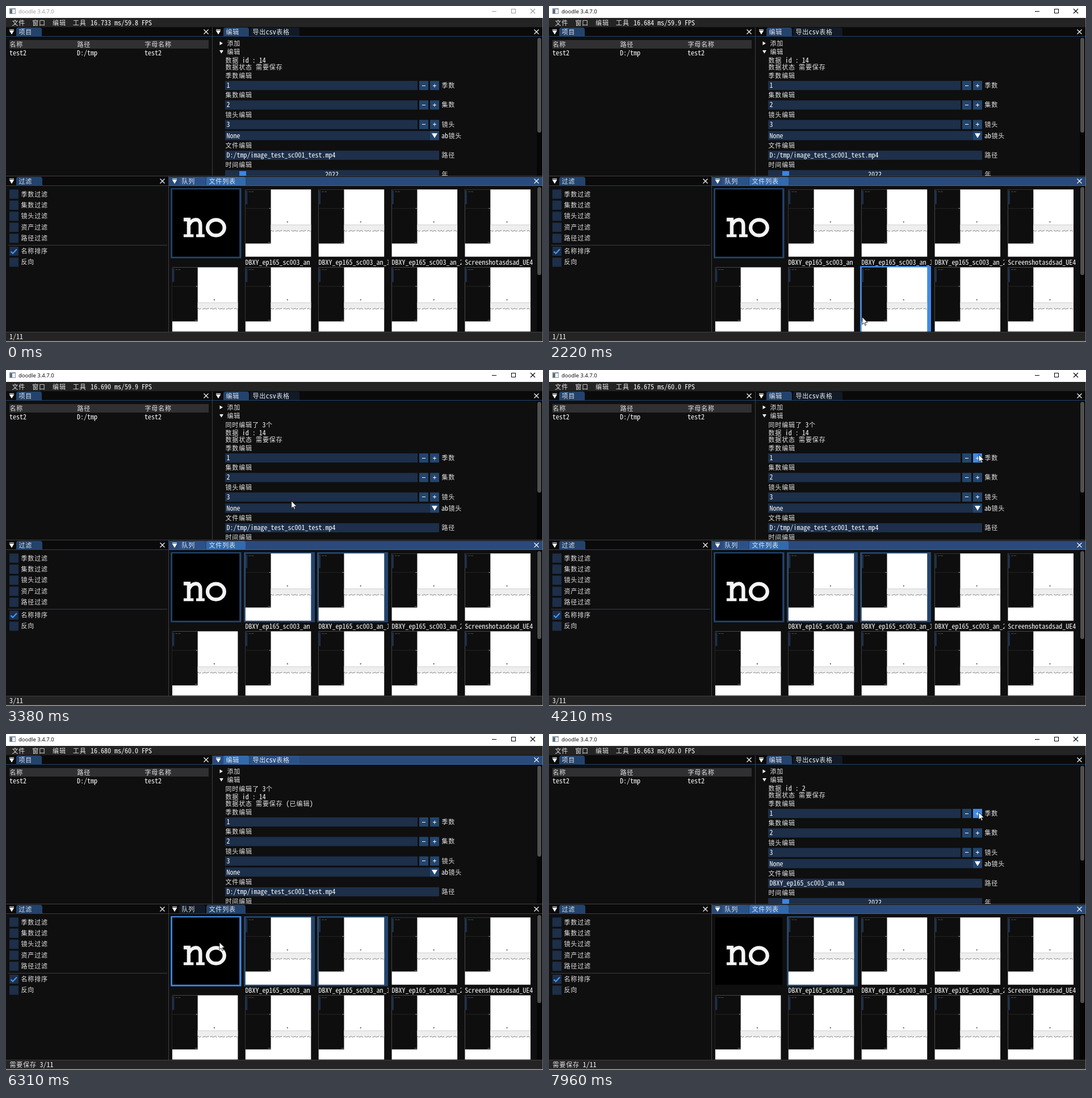
An HTML page with a canvas for the animation above (8 s loop, 946x592 px).

```html
<!DOCTYPE html>
<html lang="zh">
<head>
<meta charset="utf-8">
<title>doodle</title>
<style>
html, body { margin: 0; width: 100%; height: 100%; overflow: hidden; background: #0f0f0f; }
canvas { display: block; }
</style>
</head>
<body>
<canvas id="stage" width="946" height="592"></canvas>
<script>
const ctx = document.getElementById('stage').getContext('2d');
const LOOP = 8000;
const C = {
  bg: '#0f0f0f', bar: '#242424', title: '#0a0a0a', titleOn: '#294a7a',
  tab: '#2b5288', tabOn: '#3369ad', tabDim: '#111a26', tabDimOn: '#23436c',
  frame: '#1d2f49', button: '#23456d', hover: '#3f8ae6', grab: '#3d85e0',
  check: '#4296fa', line: '#3f3f47', scroll: '#4f4f4f', head: '#303033'
};

// Pointer path: time, x, y
const PATH = [
  [1320, 508, 590], [1400, 510, 560], [1480, 513, 519], [1700, 520, 505],
  [2060, 535, 540], [2300, 560, 552], [2600, 580, 420], [2850, 573, 369],
  [2960, 573, 369], [3140, 540, 318], [3380, 502, 231], [3710, 750, 147],
  [3960, 757, 149], [4960, 757, 149], [5130, 735, 149], [5500, 735, 149],
  [5800, 620, 230], [6070, 460, 318], [6290, 376, 367], [6680, 376, 367],
  [6800, 470, 370], [7310, 480, 360], [7460, 629, 160], [7580, 629, 160],
  [7720, 757, 138], [8000, 757, 138]
];
// Frame cost: time, milliseconds
const COST = [
  [0, 16.733], [80, 16.709], [320, 16.686], [490, 16.686], [1230, 16.68],
  [1480, 16.69], [2880, 16.678], [3380, 16.69], [4780, 16.665],
  [6310, 16.68], [7470, 16.69], [7640, 16.703], [7960, 16.663], [8000, 16.663]
];
const FOCUS = 1900, RANGE = 2970, PLUS = 4500, MINUS = 5400, FIRST = 6450, SECOND = 6880;
const FRAME_H = 16.2;

function sample(keys, t, col) {
  let i = 1;
  while (i < keys.length - 1 && keys[i][0] < t) i++;
  const a = keys[i - 1], b = keys[i];
  const k = Math.min(1, Math.max(0, (t - a[0]) / (b[0] - a[0])));
  return a[col] + (b[col] - a[col]) * k;
}

const CJK = '300 11px "Noto Sans CJK SC", "Noto Sans CJK", sans-serif';
ctx.font = '12px "Noto Sans Mono CJK SC", monospace';
const halfWidth = Math.abs(ctx.measureText('0').width - 6) < 0.1;
const LATIN = halfWidth ? ctx.font : '10px "Noto Sans Mono", "DejaVu Sans Mono", monospace';

// Mixed text on a grid of 6 and 12 px cells, y is the middle of the line
function text(s, x, y) {
  for (const run of s.match(/[\x00-\x7f]+|[^\x00-\x7f]+/g)) {
    const wide = run.charCodeAt(0) > 127;
    ctx.font = wide ? CJK : LATIN;
    ctx.letterSpacing = wide ? '0.9px' : '0px';
    ctx.fillStyle = wide ? '#e4e4e4' : '#fff';
    ctx.fillText(run, x + (wide ? .4 : 0), Math.round(y + 4));
    x += run.length * (wide ? 11.9 : 6);
  }
  ctx.letterSpacing = '0px';
}

function rect(color, x, y, w, h) {
  ctx.fillStyle = color;
  ctx.fillRect(x, y, w, h);
}

const frame = (color, x, y, w) => rect(color, x, y - FRAME_H / 2, w, FRAME_H);

function round(color, x, y, w, h, r) {
  ctx.fillStyle = color;
  ctx.beginPath();
  ctx.roundRect(x, y, w, h, r);
  ctx.fill();
}

function poly(color, ...pts) {
  ctx.fillStyle = color;
  ctx.beginPath();
  pts.forEach(([x, y]) => ctx.lineTo(x, y));
  ctx.closePath();
  ctx.fill();
}

function stroke(color, width, ...lines) {
  ctx.strokeStyle = color;
  ctx.lineWidth = width;
  ctx.beginPath();
  for (const [x1, y1, x2, y2] of lines) {
    ctx.moveTo(x1, y1);
    ctx.lineTo(x2, y2);
  }
  ctx.stroke();
}

function clipped(x, y, w, h, draw) {
  ctx.save();
  ctx.beginPath();
  ctx.rect(x, y, w, h);
  ctx.clip();
  draw();
  ctx.restore();
}

const cross = (color, x, y, r) =>
  stroke(color, 1.1, [x - r, y - r, x + r, y + r], [x - r, y + r, x + r, y - r]);

const down = (x, y, r) => poly('#fff', [x - r, y - r * .8], [x + r, y - r * .8], [x, y + r * .9]);

function titleBar(on) {
  const ink = on ? '#000' : '#999';
  rect('#fff', 0, 0, 946, 21);
  rect('#8d949c', 6, 4, 11, 10);
  rect('#f4f4f4', 7, 6, 9, 7);
  rect('#56708c', 7, 6, 4, 7);
  ctx.fillStyle = ink;
  ctx.font = '9.5px "Open Sans", "Noto Sans", sans-serif';
  ctx.fillText('doodle 3.4.7.0', 22, 13);
  stroke(ink, 1, [856, 9.5, 864, 9.5]);
  ctx.strokeRect(890.5, 5.5, 7, 7);
  cross(ink, 928, 9, 4);
}

function menu(t) {
  rect(C.bar, 0, 21, 946, 16);
  ['文件', '窗口', '编辑', '工具'].forEach((s, i) => text(s, 10 + i * 35.8, 30));
  const ms = sample(COST, t, 1);
  text(`${ms.toFixed(3)} ms/${(1000 / ms).toFixed(1)} FPS`, 149, 30);
}

// tabs: label, x, width, active
function header(x, y, right, tabs, on) {
  rect(on ? C.titleOn : C.title, x, y, right - x, 15);
  rect(on ? C.tabOn : C.tabDimOn, x, y + 15, right - x, 1);
  rect('#fff', x + 6, y + 3, 8, 1);
  down(x + 10, y + 8.5, 4.3);
  for (const [label, tx, w, active] of tabs) {
    const color = on ? (active ? C.tabOn : C.tab) : (active ? C.tabDimOn : C.tabDim);
    round(color, tx, y, w, 15, [4, 4, 0, 0]);
    text(label, tx + 4, y + 8);
  }
  cross('#fff', right - 10.5, y + 7.5, 4);
}

function project() {
  header(0, 38, 363, [['项目', 18, 45, true]], false);
  rect(C.head, 6, 60, 351, 15);
  [['名称', 'test2'], ['路径', 'D:/tmp'], ['字母名称', 'test2']].forEach(([name, value], i) => {
    text(name, 6 + i * 119, 68);
    text(value, 6 + i * 119, 83);
  });
}

function stepButton(sign, x, y, p) {
  const hot = p && p.x >= x && p.x < x + 16 && p.y >= y - 8 && p.y < y + 8;
  frame(hot ? C.hover : C.button, x, y, 16);
  const mid = Math.floor(y) + .5;
  stroke('#fff', 1, [x + 5, mid, x + 11, mid]);
  if (sign === '+') stroke('#fff', 1, [x + 8, mid - 3, x + 8, mid + 3]);
}

function editor(s, p) {
  header(364, 38, 945, [['编辑', 383, 45, true], ['导出csv表格', 430, 87, false]], s.editing);
  rect('#060606', 935, 54, 10, 245);
  round(C.scroll, 936, 56, 7, s.many ? 160 : 167, 3.5);
  clipped(364, 54, 571, 245, () => {
    poly('#fff', [376.5, 62.5], [376.5, 69], [382, 65.7]);
    text('添加', 389, 66);
    down(379.5, 80.7, 3.4);
    text('编辑', 389, 81);
    if (s.many) text('同时编辑了 3个', 386, 97);
    const shift = s.many ? 15 : 0;
    ctx.translate(0, shift);
    text('数据 id : ' + s.id, 386, 96);
    text('数据状态 需要保存' + (s.edited ? ' (已编辑)' : ''), 386, 108);
    const local = p && { x: p.x, y: p.y - shift };
    [['季数', s.season], ['集数', 2], ['镜头', 3]].forEach(([label, value], i) => {
      const y = 140 + i * 34.4;
      text(label + '编辑', 386, y - 17);
      frame(C.frame, 386, y, 339);
      text(String(value), 388.5, y);
      stepButton('-', 728, y, local);
      stepButton('+', 747, y, local);
      text(label, 767, y);
    });
    frame(C.frame, 386, 228.3, 361);
    frame(C.button, 747, 228.3, 16);
    down(755, 228.3, 5);
    text('None', 388.5, 229);
    text('ab镜头', 767, 229);
    text('文件编辑', 386, 246);
    frame(C.frame, 386, 263, 377);
    text(s.path, 388.5, 263);
    text('路径', 767, 263);
    text('时间编辑', 386, 280);
    frame(C.frame, 386, 297.2, 377);
    rect(C.grab, 411, 291, 12, 12);
    text('2022', 562, 297);
    text('年', 767, 297);
  });
}

function filters() {
  header(0, 301, 286, [['过滤', 18, 46, true]], false);
  ['季数过滤', '集数过滤', '镜头过滤', '资产过滤', '路径过滤', '名称排序', '反向'].forEach((label, i) => {
    const y = 331.5 + i * 19.45 + (i > 4 ? 3.2 : 0);
    frame(C.frame, 6, y, 16);
    text(label, 26, y);
  });
  rect(C.line, 4, 421, 280, 1);
  ctx.strokeStyle = C.check;
  ctx.lineWidth = 2.2;
  ctx.beginPath();
  ctx.moveTo(8.5, 432.5);
  ctx.lineTo(12, 436);
  ctx.lineTo(19, 428.5);
  ctx.stroke();
}

function placeholder(x, y) {
  rect('#000', x, y, 118.3, 118.5);
  ctx.save();
  ctx.translate(x, y);
  ctx.strokeStyle = '#f4f4f4';
  ctx.lineWidth = 6.4;
  ctx.beginPath();
  ctx.moveTo(20, 53);
  ctx.lineTo(29, 53);
  ctx.lineTo(29, 82);
  ctx.moveTo(29, 63);
  ctx.bezierCurveTo(34, 51, 49.5, 49, 49.5, 63);
  ctx.lineTo(49.5, 82);
  ctx.moveTo(91.8, 67.3);
  ctx.ellipse(77, 67.3, 14.8, 13.8, 0, 0, 7);
  ctx.stroke();
  ctx.lineWidth = 5;
  ctx.beginPath();
  ctx.moveTo(20, 81.5);
  ctx.lineTo(37.5, 81.5);
  ctx.moveTo(42, 81.5);
  ctx.lineTo(57, 81.5);
  ctx.stroke();
  ctx.restore();
}

function screenshot(x, y) {
  rect('#fff', x, y, 115.5, 118.5);
  rect('#0e0e0e', x, y, 44.8, 95.3);
  rect(C.frame, x, y + 2, 3.5, 24);
  for (const dx of [6, 8, 11, 13]) rect('#8a8a8a', x + dx, y + 3.5, 1, 1);
  rect('#252525', x, y + 33, 44, 1);
  rect('#ccc', x + 42, y + 33, 2, 1);
  rect('#777', x + 40, y + 93, 4, 1);
  rect('#eee', x + 44.8, y + 62, 70.7, 10);
  rect('#d2d2d2', x + 44.8, y + 62, 70.7, 1);
  rect('#333', x + 73, y + 56.5, 2, 1.5);
  for (let i = 0; i < 35; i++) {
    if (i % 7 !== 3) rect('#444', x + 45 + i * 2, y + 72 + (i * 5 % 3) * .5, 1.4, 1);
  }
}

const NAMES = ['', 'DBXY_ep165_sc003_an', 'DBXY_ep165_sc003_an_1', 'DBXY_ep165_sc003_an_2', 'Screenshotasdsad_UE4'];

function files(s, p) {
  header(287, 301, 945, [['队列', 305, 46, false], ['文件列表', 353, 69, true]], !s.editing);
  rect('#060606', 935, 317, 10, 257);
  round(C.scroll, 936, 319, 7, 155, 3.5);
  clipped(287, 317, 648, 256.5, () => {
    for (let i = 0; i < 10; i++) {
      const col = i % 5, x = 290.2 + col * 128.9, y = i < 5 ? 321 : 458.2;
      const size = i ? 125 : 124.3;
      const hot = p && p.x >= x && p.x < x + size && p.y >= y && p.y < Math.min(y + 123.5, 573);
      if (hot || s.selected.includes(i)) rect(hot ? C.hover : C.button, x, y, size, 123.5);
      (i ? screenshot : placeholder)(x + 2.7, y + 2.2);
      if (i && i < 5) clipped(x + 2.5, 444, 123, 15, () => text(NAMES[col], x + 2.5, 452));
    }
  });
}

function pointer({ x, y }) {
  ctx.save();
  ctx.translate(x, y);
  ctx.scale(.8, .8);
  poly('#fff', [0, 0], [0, 16.2], [3.8, 12.7], [6.3, 18.4], [8.8, 17.3], [6.4, 11.8], [11.6, 11.8]);
  ctx.strokeStyle = '#000';
  ctx.lineWidth = 1;
  ctx.stroke();
  ctx.restore();
}

function stateAt(t) {
  const many = t >= RANGE && t < FIRST;
  const second = t >= SECOND;
  const editing = t >= PLUS && t < FIRST;
  return {
    many,
    selected: many ? [0, 1, 2] : [second ? 1 : 0],
    editing,
    edited: editing,
    season: t >= PLUS && t < MINUS ? 2 : 1,
    id: second ? 2 : 14,
    path: second ? 'DBXY_ep165_sc003_an.ma' : 'D:/tmp/image_test_sc001_test.mp4',
    status: (t >= PLUS ? '需要保存 ' : '') + (many ? '3/11' : '1/11')
  };
}

function draw(t) {
  const s = stateAt(t);
  const p = t >= PATH[0][0] ? { x: sample(PATH, t, 1), y: sample(PATH, t, 2) } : null;
  rect(C.bg, 0, 0, 946, 592);
  titleBar(t >= FOCUS);
  menu(t);
  project();
  editor(s, p);
  filters();
  files(s, p);
  rect(C.line, 363, 38, 1, 261);
  rect(C.line, 0, 299, 945, 1);
  rect(C.line, 286, 300, 1, 274);
  rect(C.bar, 0, 574, 946, 16);
  rect(C.line, 0, 574, 946, 1);
  text(s.status, 6, 583);
  rect('#777', 945, 21, 1, 571);
  rect('#aaa', 0, 590.5, 946, 1.5);
  if (p) pointer(p);
}

const start = performance.now();
function tick() {
  draw((performance.now() - start) % LOOP);
  requestAnimationFrame(tick);
}
tick();
</script>
</body>
</html>
```
